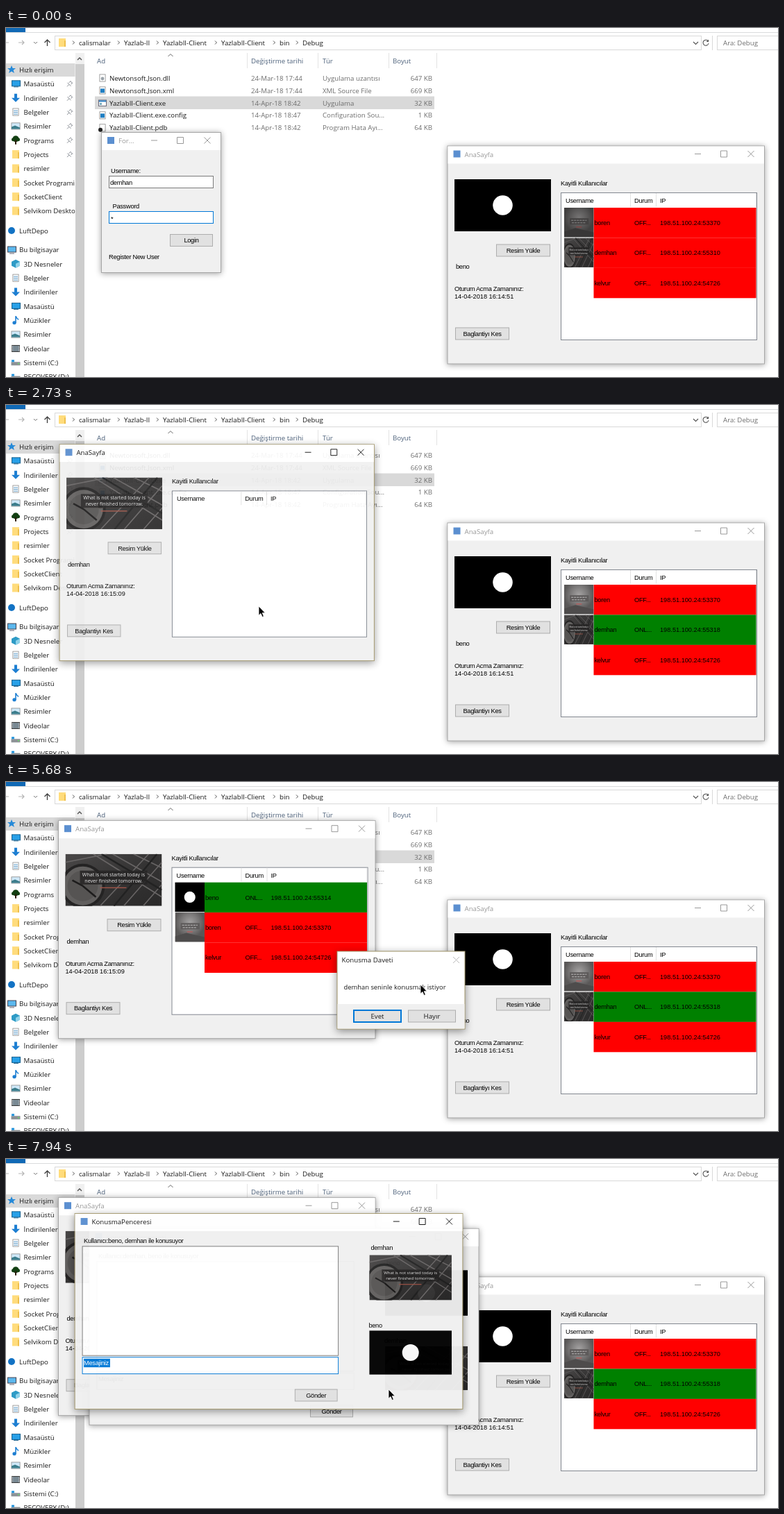
Write an HTML page that moves like this. It is 1112 by 503 pixels and loops after 8000 ms.

```html
<!DOCTYPE html>
<html lang="tr">
<head>
<meta charset="utf-8">
<title>Client demo</title>
<style>
html, body { margin: 0; width: 100%; height: 100%; overflow: hidden; background: #fff; }
svg { display: block; width: 100%; height: 100%; }
text { font: 9.7px 'Open Sans', sans-serif; fill: #1a1a1a; white-space: pre; }
.form { font: 9.3px 'Liberation Sans', Arial, sans-serif; letter-spacing: -.3px; fill: #000; }
.num { font-size: 9.2px; letter-spacing: 0; }
.mid { text-anchor: middle; }
.end { text-anchor: end; }
.dim { fill: #6d6d6d; }
.head { fill: #4c607a; }
.quote { font-size: 7.1px; fill: #e8e8e8; text-anchor: middle; }
.win { transform-box: fill-box; transform-origin: center; }
.win .frame { filter: drop-shadow(0 1px 4px rgba(0,0,0,.38)); stroke: #a6a6a6; }
.win.on .frame { filter: drop-shadow(0 3px 6px rgba(0,0,0,.42)); stroke: #a09468; }
.win .cap { fill: #999; }
.win .glyph { stroke: #999; fill: none; }
.win.on .cap { fill: #111; }
.win.on .glyph { stroke: #111; }
.win .glyph.off { stroke: #bbb; }
</style>
</head>
<body>
<svg id="stage" viewBox="0 0 1112 503" preserveAspectRatio="none"></svg>
<script>
const LOOP = 8000, BLUE = '#0078d7', RED = '#ff0000', GREEN = '#008000';
const HOST = '198.51.100.24:';
const [ME, OTHER, THIRD, FOURTH] = ['demhan', 'beno', 'boren', 'kelvur'];

// ---- drawing helpers ----
const rect = (x, y, w, h, fill, more = '') =>
  `<rect x="${x}" y="${y}" width="${w}" height="${h}" fill="${fill}" ${more}/>`;
const box = (x, y, w, h, fill, stroke, sw = 1, more = '') =>
  rect(x + sw / 2, y + sw / 2, w - sw, h - sw, fill, `stroke="${stroke}" stroke-width="${sw}" ${more}`);
const line = (d, stroke, sw = 1, more = '') =>
  `<path d="${d}" fill="none" stroke="${stroke}" stroke-width="${sw}" ${more}/>`;
const shape = (d, fill) => `<path d="${d}" fill="${fill}"/>`;
const disc = (x, y, r, fill) => `<circle cx="${x}" cy="${y}" r="${r}" fill="${fill}"/>`;
const text = (x, y, s, cls = '', more = '') => `<text x="${x}" y="${y}" class="${cls}" ${more}>${s}</text>`;
const form = (x, y, s, cls = '', more = '') => text(x, y, s, 'form ' + cls, more);
const group = (id, body, more = '') => `<g id="${id}" ${more}>${body}</g>`;
const button = (x, y, w, label, id = '', cls = 'form') =>
  box(x, y, w, 18, '#e1e1e1', '#adadad', 1, id && `id="${id}"`) + text(x + w / 2, y + 12.3, label, cls + ' mid');

function controls(x, y) {
  return `<path class="glyph" d="M${x - 81} ${y}h9M${x - 43.5} ${y - 4.5}h9v9h-9z
    M${x - 4.5} ${y - 4.5}l9 9m0 -9l-9 9"/>`;
}

function win(id, x, y, w, h, title, body) {
  return group(id,
    box(x, y, w, h, '#f0f0f0', '#aaa', 1, 'class="frame"') +
    rect(x + 1, y + 1, w - 2, 25, '#fff') +
    rect(x + 9, y + 7, 10, 10, '#5b8fd0') +
    text(x + 25, y + 16, title, 'cap') + controls(x + w - 20, y + 12) + body, 'class="win"');
}

// ---- pictures ----
const defs = `<defs>
  <linearGradient id="roof" x2="1" y2="1"><stop stop-color="#4a4848"/><stop offset=".5" stop-color="#353434"/><stop offset="1" stop-color="#2a2929"/></linearGradient>
  <radialGradient id="haze" cy=".35"><stop stop-color="#a5a3a3"/><stop offset=".6" stop-color="#7a7878"/><stop offset="1" stop-color="#5a5858"/></radialGradient>
  <symbol id="station" viewBox="0 0 139 75" preserveAspectRatio="none">
    ${rect(0, 0, 139, 75, 'url(#roof)')}
    ${line('M40 0L139 62M68 0L139 40M98 0L139 20M50 75L120 0M84 75L139 12M112 75L139 44M0 12L60 0', '#686565', 1.6)}
    ${line('M52 0L139 52M70 75L132 0', '#222', 2.5)}
    ${disc(25, 46, 32, '#242323')}${disc(25, 46, 28, '#62605f')}${disc(25, 46, 22, '#565453')}
    ${line('M25 46L44 62M25 46L10 38', '#1d1c1c', 2.5)}
    ${rect(21, 24, 97, 20, '#262525', 'opacity=".85"')}
    ${text(69.5, 32, 'What is not started today is', 'quote')}
    ${text(69.5, 41, 'never finished tomorrow.', 'quote')}
    ${rect(50, 48, 38, 1.4, '#a05548')}
  </symbol>
  <symbol id="mist" viewBox="0 0 42 42" preserveAspectRatio="none">
    ${rect(0, 0, 42, 42, 'url(#haze)')}
    ${shape('M0 42V34L16 29L42 35V42Z', '#4e4c4c')}
    ${rect(8, 15, 27, 9, '#5e5b5b')}
    ${line('M10 18h22M11 21.5h20', '#c9c7c7', .9, 'stroke-dasharray="3 1"')}
    ${rect(17, 27, 8, 1, '#c55')}
  </symbol></defs>`;
const photo = (name, x, y, w, h) => `<use href="#${name}" x="${x}" y="${y}" width="${w}" height="${h}"/>`;
const badge = (x, y, w, h) => rect(x, y, w, h, '#000') + disc(x + w / 2, y + h / 2, h * .19, '#fff');
const picture = (user, ...b) => user === OTHER ? badge(...b) : user === FOURTH ? '' :
  photo(user === ME ? 'station' : 'mist', ...b);

// ---- file browser ----
const sheet = (x, y) => box(x - 4.5, y - 5.5, 9, 11, '#fff', '#8a8a8a', .8);
const icons = {
  star: (x, y) => shape(`M${x} ${y - 6}l1.7 4h4.3l-3.4 2.7 1.3 4.3-3.9-2.6-3.9 2.6 1.3-4.3-3.4-2.7h4.3z`, '#2589d8'),
  desk: (x, y) => box(x - 6, y - 5, 13, 9, '#28a0e8', '#14608f') + rect(x - 3, y + 4, 7, 1, '#14608f'),
  down: (x, y) => shape(`M${x - 2} ${y - 6}h4v6h4l-6 6-6-6h4z`, '#1e7fd2'),
  doc: (x, y) => sheet(x, y) + line(`M${x - 3} ${y - 2}h6m-6 2.5h6m-6 2.5h6`, '#4a90c4', .9),
  pic: (x, y) => box(x - 6.5, y - 5, 13, 10, '#cfe8f8', '#8a8a8a', .8) + shape(`M${x - 6} ${y + 4}v-3l5-2 7 3v2z`, '#3c7d8c'),
  tree: (x, y) => disc(x, y - 2, 4.5, '#123f12') + disc(x - 3.5, y - 1, 2.5, '#123f12') + disc(x + 3.5, y - 1, 2.5, '#123f12') + rect(x - 1, y, 2, 6, '#2a1a0c'),
  dir: (x, y) => rect(x - 5, y - 6, 10, 12, '#ffdc7c') + rect(x + 3, y - 3, 2, 9, '#eebf4d'),
  cloud: (x, y) => disc(x, y, 5, '#1272c4'),
  pc: (x, y) => box(x - 6, y - 5, 13, 9, '#5cb8ee', '#445') + rect(x - 3, y + 5, 7, 1, '#667'),
  cube: (x, y) => shape(`M${x} ${y - 6}l6 3v6l-6 3-6-3v-6z`, '#2e9bc6') + shape(`M${x} ${y}l6-3v6l-6 3z`, '#8fd3ea'),
  note: (x, y) => disc(x - 2, y + 3.5, 2.6, '#1e7fd2') + line(`M${x} ${y + 4}v-10q1 3 4 5`, '#1e7fd2', 1.6),
  film: (x, y) => box(x - 6, y - 5, 12, 10, '#7a8a94', '#333') + line(`M${x - 5} ${y - 4}v8m10 0v-8`, '#fff', 1, 'stroke-dasharray="1.5 1"'),
  disk: (x, y) => rect(x - 6.5, y - 1, 13, 5, '#8d9296') + rect(x - 6, y - 4, 4, 3, '#2494dc') + rect(x + 3, y + 1, 2, 1, '#5f5'),
  lib: (x, y) => sheet(x, y) + disc(x, y + 1, 2.4, '#9aa3aa'),
  code: (x, y) => sheet(x, y) + rect(x - 3, y - 2.5, 6, 6, '#1f7ec2'),
  app: (x, y) => box(x - 6, y - 4.5, 12, 9.5, '#fff', '#667') + rect(x - 5, y - 3.5, 10, 2, '#2b7fc4') + rect(x - 4, y, 3, 3, '#7ab'),
  dbg: (x, y) => sheet(x, y) + disc(x - 3, y + 3, 3, '#222')
};

function sidebar() {
  const groups = [
    [60, 'star Hızlı erişim|desk Masaüstü|down İndirilenler|doc Belgeler|pic Resimler|tree Programs|dir Projects|dir resimler|dir Socket Programi|dir SocketClient|dir Selvikom Deskto'],
    [292, 'cloud LuftDepo'],
    [319.5, 'pc Bu bilgisayar|cube 3D Nesneler|doc Belgeler|down İndirilenler|desk Masaüstü|note Müzikler|pic Resimler|film Videolar|disk Sistemi (C:)|disk RECOVERY (D:)']
  ];
  let s = rect(0, 51, 100, 19, '#d9d9d9');
  groups.forEach(([top, list], g) => list.split('|').forEach((item, i) => {
    const cut = item.indexOf(' '), y = top + i * 20.35;
    s += icons[item.slice(0, cut)](i ? 14 : 8, y) + text(i ? 25.5 : 19, y + 3.8, item.slice(cut + 1));
    if (!g && i && i < 7) s += line(`M${88} ${y + 4}l3-3m-2.5-2.5l5 5m-3-5l3-2.5m0 5l2-2.5m-2.5-2l3 3`, '#8a8f96', 1);
  }));
  return `<svg width="99.5" height="503">${s}</svg>` + rect(100, 36, 13, 467, '#f0f0f0') +
    rect(100, 52, 13, 451, '#cdcdcd') + line('M103 46l3-3 3 3', '#505050', 1.4);
}

function explorer() {
  const crumbs = [[105, 'calismalar'], [170, 'Yazlab-II'], [226, 'YazlabII-Client'], [310, 'YazlabII-Client'], [394, 'bin'], [427, 'Debug']];
  const files = [
    ['lib', 'Newtonsoft.Json.dll', '24-Mar-18 17:44', 'Uygulama uzantısı', 647],
    ['code', 'Newtonsoft.Json.xml', '24-Mar-18 17:44', 'XML Source File', 669],
    ['app', 'YazlabII-Client.exe', '14-Apr-18 18:42', 'Uygulama', 32],
    ['code', 'YazlabII-Client.exe.config', '14-Apr-18 18:47', 'Configuration Sou...', 1],
    ['dbg', 'YazlabII-Client.pdb', '14-Apr-18 18:42', 'Program Hata Ayı...', 64]
  ];
  return rect(0, 0, 1112, 503, '#fff') + rect(0, 0, 28, 6, '#1069b5') + line('M0 6.5H1112', '#dadbdc') +
    box(70, 11, 932, 21, '#fff', '#d9d9d9') + line('M1017.5 11V32', '#d9d9d9') + box(1024, 11, 92, 21, '#fff', '#d9d9d9') +
    line('M0 21h4M18 21h8m-3-3l3 3-3 3', '#b5b5b5', 1.2) + line('M40 20l2.5 2.5 2.5-2.5', '#777') +
    line('M59.500 26v-9m-4 4l4-4 4 4', '#444', 1.4) + line('M990 20l3.500 3.500 3.500-3.500', '#555', 1.2) +
    line('M1011 18.500a4 4 0 1 0 1 3.500m-.5-5v2.500h-2.500', '#555', 1.1) + icons.dir(81, 21) +
    crumbs.map(([x, s]) => line(`M${x - 9} 18.500l2.500 2.500-2.500 2.500`, '#555') + text(x, 25, s)).join('') +
    text(1033, 25, 'Ara: Debug', 'dim') +
    [[131, 'Ad'], [353, 'Değiştirme tarihi'], [456, 'Tür'], [557, 'Boyut']].map(([x, s]) => text(x, 51, s, 'head')).join('') +
    line('M347.500 36V58M449.500 36V58M551.500 36V58M620.500 36V58', '#e3e3e3') + line('M233.500 41l3.500-3.500 3.500 3.500', '#666') +
    rect(128, 98.5, 489, 18.5, '#d9d9d9') +
    files.map(([kind, name, date, type, size], i) => {
      const y = 72 + i * 17.95;
      return icons[kind](139, y) + text(149, y + 3.6, name) + text(353, y + 3.6, date, 'dim') +
        text(456, y + 3.6, type, 'dim') + text(614, y + 3.6, size + ' KB', 'dim end');
    }).join('') + sidebar();
}

// ---- application windows ----
const login = () => win('login', 137, 150, 173, 203, 'For...',
  form(151, 209, 'Username:') + box(148, 213, 151, 18, '#fff', '#7a7a7a') + form(150, 225.5, ME) +
  form(153.5, 260, 'Password') + box(148, 264, 151, 18, '#fff', '#7a7a7a', 1, 'id="pass"') + form(151, 278, '*') +
  button(236, 297, 62, 'Login', 'enter') + form(148, 333, 'Register New User'));

function row(i, user, state, port, color) {
  const y = 259 + i * 43.4;
  return rect(846.5, y, 234, 43.5, color) + picture(user, 804, y, 42.5, 42.5) + form(847.5, y + 25, user) +
    form(905, y + 25, state) + form(942, y + 25, HOST + port, 'num');
}

const panel = (id, user, clock, rows) => win(id, 635.5, 169.5, 457.5, 315, 'AnaSayfa',
  picture(user, 646, 218, 139, 75) + form(799, 227, 'Kayitli Kullanıcılar') +
  box(799, 237, 283, 213, '#fff', '#828790') +
  form(806, 252, 'Username') + form(905, 252, 'Durum') + form(942, 252, 'IP') +
  line('M899.500 238V258M936.500 238V258M1080.500 238V258', '#e2e2e2') + rows +
  button(706, 311.5, 78, 'Resim Yükle') + form(648, 347, user) +
  form(646, 379, 'Oturum Acma Zamanınız:') + form(646, 390, '14-04-2018 ' + clock, 'num') +
  button(647, 431.5, 78, 'Baglantiyı Kes'));

const dialog = (id, x, w, title, cross, message, buttons) => group(id,
  box(x, 243.5, w, 113, '#fff', '#aaa', 1, 'class="frame"') + rect(x + 1, 320, w - 2, 35.5, '#f0f0f0') +
  text(x + 7, 260, title) + `<path class="glyph ${cross}" d="M${x + w - 17.5} 252l9 9m0-9l-9 9"/>` +
  text(x + 10, 299, message, '', 'style="font-size:9.4px"') + buttons, 'class="win"');

function chat(id, from, to) {
  const front = id === 'chatA';
  return win(id, 97.5, 77.5, 562, 284, 'KonusmaPenceresi',
    form(111, 121, `Kullanıcı:${from}, ${to} ile konusuyor`) +
    box(108.5, 125, 371, 159, '#fff', '#7a7a7a') + box(108.5, 285.5, 371, 25, '#fff', front ? BLUE : '#7a7a7a') +
    (front ? rect(111, 288, 38, 12.5, BLUE) : '') + form(111, 297.5, 'Mesajiniz', '', front ? 'style="fill:#fff"' : '') +
    button(416, 332, 62, 'Gönder') +
    form(526, 131, to) + picture(to, 524, 138, 119, 65.5) +
    form(523, 243, from) + picture(from, 524, 247.5, 119, 63.5));
}

const shift = (x, y, body) => `<g transform="translate(${x} ${y})">${body}</g>`;
const third = i => row(i, THIRD, 'OFF...', 53370, RED), fourth = i => row(i, FOURTH, 'OFF...', 54726, RED);
const stage = document.getElementById('stage');
stage.innerHTML = defs + explorer() + login() +
  panel('right', OTHER, '16:14:51',
    group('before', third(0) + row(1, ME, 'OFF...', 55310, RED) + fourth(2) + rect(804, 259, 42.5, 42.5, '#000', 'opacity=".28"')) +
    group('after', third(0) + row(1, ME, 'ONL...', 55318, GREEN) + fourth(2))) +
  shift(-560.5, -114.3, panel('left', ME, '16:15:09', group('users',
    row(0, OTHER, 'ONL...', 55314, GREEN) + third(1) + fourth(2) +
    group('picked', row(0, OTHER, 'ONL...', 55314, '#fff') + rect(804, 259, 42.5, 42.5, BLUE, 'opacity=".5"') +
      rect(846.5, 259, 25, 42.5, BLUE) + form(847.5, 284, OTHER, '', 'style="fill:#fff"'))))) +
  dialog('done', 514.5, 108, '', '', 'Giris basarili', button(539, 328.5, 69, 'Tamam', 'ok', '')) +
  dialog('invite', 476.5, 185, 'Konusma Daveti', 'off', ME + ' seninle konusmak istiyor',
    button(500.5, 328.5, 69, 'Evet', 'yes', '') + button(579, 328.5, 69, 'Hayır', '', '')) +
  shift(22, 22.3, chat('chatB', ME, OTHER)) + chat('chatA', OTHER, ME) +
  group('cursor', `<path d="M0 0V13.200L3 10.500 5.200 15.500 7.300 14.600 5.200 9.700H9.300Z" fill="#000" stroke="#fff" stroke-width=".8"/>`);

const el = {};
stage.querySelectorAll('g[id], rect[id]').forEach(e => el[e.id] = e);

// ---- timing ----
// The screen refreshes in bursts: start, end, count.
const bursts = [[70, 450, 6], [700, 1240, 8], [1410, 1780, 6], [1930, 2010, 2], [2160, 2330, 3], [2480, 3040, 8],
  [3260, 3720, 7], [4180, 4340, 3], [4570, 4570, 1], [4870, 5510, 9], [5680, 5770, 2], [6130, 6450, 5], [6610, 6920, 5], [7530, 7940, 6]];
const path = [[70, 982, 465], [450, 691, 325], [625, 691, 325], [1240, 276, 306], [1600, 276, 306], [1780, 311, 306],
  [2400, 311, 306], [2720, 364, 290], [3040, 374, 275], [3255, 374, 275], [3336, 376, 198], [3720, 315, 162], [4100, 315, 162],
  [4340, 304, 167], [4500, 304, 167], [4570, 301.5, 167], [4870, 301.5, 167], [5430, 597, 292], [6050, 597, 292],
  [6450, 547, 321], [6540, 547, 321], [6920, 551, 332]];

function snap(t) {
  const b = bursts.filter(b => b[0] <= t).pop();
  if (!b) return 0;
  const [start, end, n] = b, d = (end - start) / Math.max(1, n - 1);
  return start + Math.min(n - 1, d ? Math.floor((t - start) / d + 1e-6) : 0) * d;
}

function along(keys, t) {
  const i = keys.findIndex(k => k[0] > t);
  if (i < 0) return keys[keys.length - 1].slice(1);
  if (!i) return keys[0].slice(1);
  const a = keys[i - 1], b = keys[i], u = (t - a[0]) / (b[0] - a[0]);
  return a.slice(1).map((v, k) => v + (b[k + 1] - v) * u);
}

const show = (id, on) => el[id].setAttribute('display', on ? 'inline' : 'none');
const active = (id, on) => el[id].classList.toggle('on', on);

function fade(id, keys, t) {
  const [o] = along(keys, t);
  show(id, o > 0);
  el[id].style.opacity = o;
  el[id].style.transform = o < 1 ? `scale(${1 - .1 * (1 - o)})` : 'none';
}

function outline(id, color, sw = 1, fill = '#e1e1e1') {
  const e = el[id];
  e.setAttribute('stroke', color);
  e.setAttribute('stroke-width', sw);
  e.setAttribute('fill', fill);
}

function draw(time) {
  const t = snap(time), during = (a, b) => t >= a && t < b;
  const [x, y] = along(path, t);
  show('cursor', t >= 70);
  el.cursor.setAttribute('transform', `translate(${x} ${y})`);

  outline('pass', t < 140 ? BLUE : '#7a7a7a', 1, '#fff');
  outline('enter', t < 140 ? '#adadad' : BLUE, t < 140 ? 1 : 2, during(1200, 1600) ? '#e5f1fb' : '#e1e1e1');
  active('login', during(1400, 1600) || during(2200, 2400));
  fade('login', [[2160, 1], [2330, 0]], t);
  fade('done', [[1540, 0], [1700, 1], [2100, 1], [2240, 0]], t);
  active('done', true);
  outline('ok', BLUE, 2);

  show('before', t < 1920);
  show('after', t > 2000);

  fade('left', [[2480, 0], [2640, .7], [2720, .93], [2800, 1]], t);
  active('left', t < 5670);
  show('users', t > 3480);
  show('picked', during(4860, 5500));

  fade('invite', [[5340, 0], [5500, 1], [7460, 1], [7600, 0]], t);
  active('invite', t > 5670);
  outline('yes', BLUE, t > 6600 ? 1.2 : 2, t > 6600 ? '#e5f1fb' : '#e1e1e1');

  fade('chatB', [[7610, 0], [7694, .6], [7770, 1]], t);
  active('chatB', t < 7800);
  fade('chatA', [[7770, 0], [7858, .6], [7939, .96]], t);
  active('chatA', true);
}

const start = performance.now();
function tick() {
  draw((performance.now() - start) % LOOP);
  requestAnimationFrame(tick);
}
tick();
</script>
</body>
</html>
```
